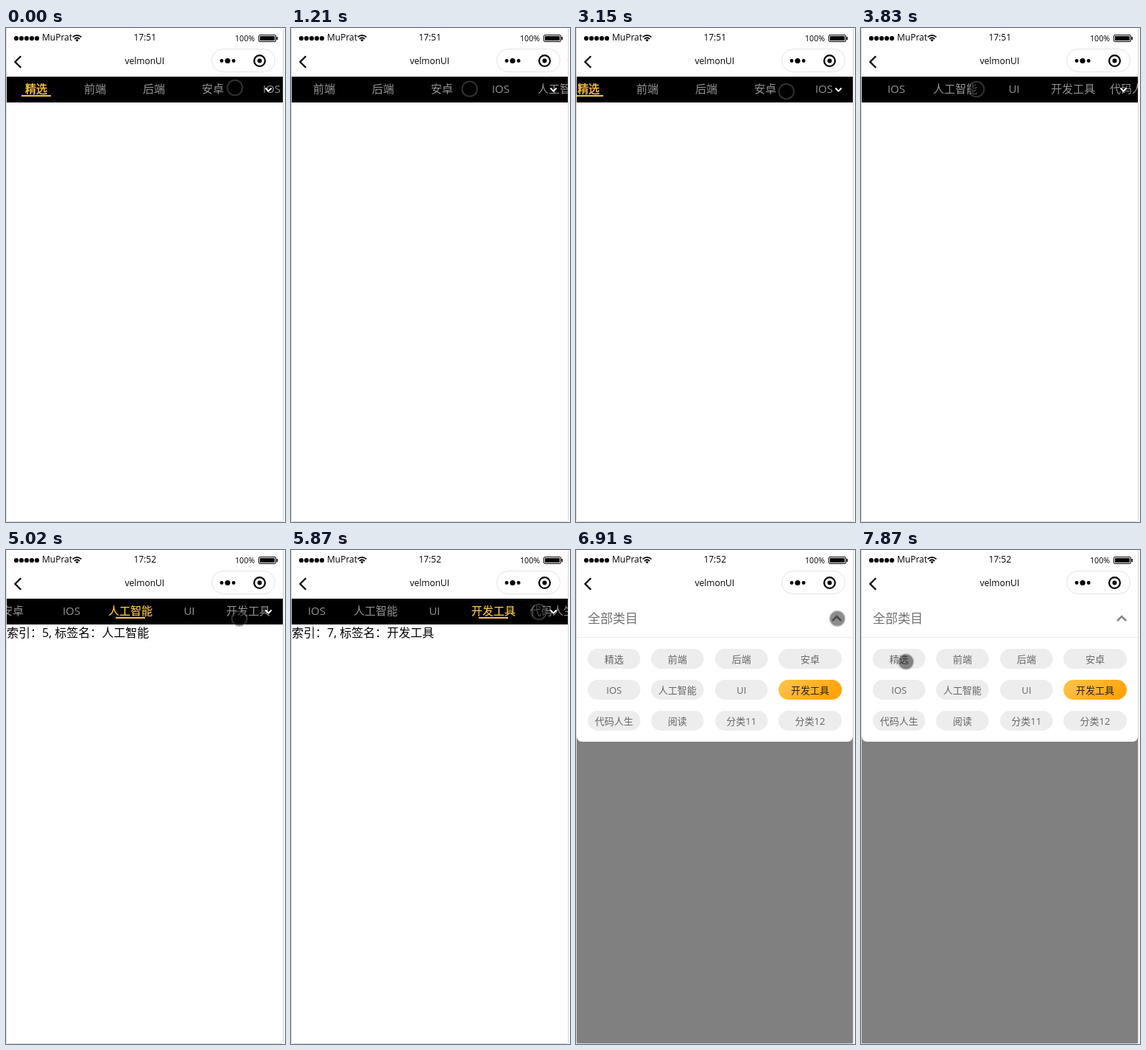
These frames come from a looping animation (379x670 px, 8000 ms). An HTML page:

```html
<!DOCTYPE html>
<html lang="zh-CN">
<head>
<meta charset="utf-8">
<title>Tabs</title>
<style>
html, body { margin: 0; width: 100%; height: 100%; overflow: hidden; background: #fff; }
svg { display: block; width: 379px; height: 670px; }
text { font-family: "Open Sans", "Noto Sans CJK SC", "Noto Sans CJK", sans-serif; white-space: pre; }
.mid { text-anchor: middle; }
.line { fill: none; stroke: #000; }
.tab { font-size: 15px; fill: #929292; }
.tab.on { fill: #f9c246; stroke: #f9c246; stroke-width: .2px; }
.pill { font-size: 13px; fill: #666; }
.pill.on { fill: #222; }
.page { filter: drop-shadow(0 0 1.5px rgba(0,0,0,.4)); }
</style>
</head>
<body>
<svg viewBox="0 0 379 670">
  <defs>
    <clipPath id="screen"><rect x="1" y="66" width="375" height="603"/></clipPath>
    <linearGradient id="gold" x1="0" y1="0" x2="1" y2="0.4">
      <stop offset="0" stop-color="#ffc64f"/><stop offset="1" stop-color="#ffa40a"/>
    </linearGradient>
  </defs>
  <rect class="page" x="1" y="0" width="375" height="669" fill="#fff"/>

  <g id="status">
    <text x="49" y="17" font-size="12">MuPrat</text>
    <g class="line" stroke-width="1.7">
      <path d="M90.6 12.4Q96.5 7.4 102.4 12.4"/>
      <path d="M92.8 14.8Q96.5 11.7 100.2 14.8"/>
    </g>
    <path d="M94.3 16Q96.5 14.4 98.7 16L96.5 18.4Z"/>
    <text id="clock" class="mid" x="188.7" y="17" font-size="12"></text>
    <text x="311" y="18" font-size="10.7">100%</text>
    <rect class="line" x="343.5" y="9.5" width="23" height="9" rx="1.5"/>
    <rect x="345" y="11" width="20" height="6"/>
    <rect x="367.5" y="12" width="1.5" height="4"/>
  </g>

  <path class="line" stroke-width="2.3" d="M20.2 38.2L12.4 46L20.2 53.8"/>
  <text class="mid" x="188.3" y="49" font-size="12">velmonUI</text>
  <rect x="279.5" y="28.5" width="86" height="31" rx="15.5" fill="#fff" stroke="#e4e4e4"/>
  <circle cx="293" cy="44.5" r="2.4"/>
  <circle cx="301" cy="44.5" r="3.6"/>
  <circle cx="309.2" cy="44.5" r="2.4"/>
  <circle class="line" cx="344.5" cy="44.5" r="7.4" stroke-width="2.2"/>
  <circle cx="344.5" cy="44.5" r="3"/>

  <g clip-path="url(#screen)">
    <rect x="1" y="66" width="375" height="35"/>
    <g id="tabs"><rect id="mark" y="91" width="40" height="2" fill="#f9c246"/></g>
    <path class="line" style="stroke:#fff" stroke-width="1.9" d="M352.4 81.5L356.5 85.6L360.6 81.5"/>
    <text id="info" x="1" y="118.3" font-size="16"></text>
    <g id="panel">
      <rect x="1" y="66" width="375" height="603" fill="#808080"/>
      <path d="M1 66H376V252Q376 260 368 260H9Q1 260 1 252Z" fill="#fff"/>
      <text x="16" y="99.3" font-size="17" fill="#707070">全部类目</text>
      <path class="line" style="stroke:#888" stroke-width="2.6" d="M348.2 96L354.2 90L360.2 96"/>
      <rect x="1" y="118" width="375" height="1" fill="#ececec"/>
    </g>
  </g>
  <g id="touch">
    <circle r="10" fill="#000" fill-opacity=".45"/>
    <circle r="10.2" fill="none" stroke="#808080" stroke-opacity=".38" stroke-width="2"/>
  </g>
</svg>
<script>
const NAMES = ["精选", "前端", "后端", "安卓", "IOS", "人工智能", "UI", "开发工具", "代码人生", "阅读", "分类11", "分类12"];
const LOOP = 8000, TAP_1 = 4320, CLOCK_AT = 5020, TAP_2 = 5720, OPEN_AT = 6910;

// bursts of screen updates: first, last, count
const BURSTS = [
  [1060, 1810, 6], [2120, 3150, 8], [3300, TAP_1, 8],
  [4440, 4590, 2], [4870, 5320, 4], [TAP_2, 6510, 7], [OPEN_AT, 7870, 8]
];

// time, scroll
const SCROLL = [
  [0, 0], [1060, 14], [1660, 262], [1810, 295], [2120, 295], [2730, 60], [3010, 10],
  [3150, 24], [3700, 313], [4200, 313], [4590, 272], [5320, 272], [TAP_2, 284], [6110, 408]
];

// time, x, y
const TOUCH = [
  [0, 311, 81], [1060, 297, 82], [1510, 134, 84], [2120, 120, 83], [2580, 284, 91],
  [3010, 308, 89], [3300, 262, 83], [3700, 157, 83], [3900, 157, 83], [TAP_1, 146, 86],
  [4590, 153, 133], [CLOCK_AT, 317, 93], [5320, 335, 84], [5980, 337, 84], [6510, 357, 81],
  [OPEN_AT, 355, 93], [7060, 353, 94], [7600, 104, 149], [7870, 61, 151.5]
];

const $ = id => document.getElementById(id);

function add(parent, tag, attrs, text = "") {
  const el = document.createElementNS("http://www.w3.org/2000/svg", tag);
  for (const key in attrs) el.setAttribute(key, attrs[key]);
  el.textContent = text;
  return parent.appendChild(el);
}

// time of the latest screen update
function lastUpdate(t) {
  const burst = BURSTS.findLast(b => b[0] <= t);
  if (!burst) return 0;
  const [first, last, count] = burst;
  const gap = (last - first) / (count - 1);
  return t >= last ? last : first + Math.floor((t - first) / gap) * gap;
}

function sample(keys, t) {
  const i = keys.findLastIndex(key => key[0] <= t);
  const a = keys[i], b = keys[i + 1] || a;
  const part = a === b ? 0 : (t - a[0]) / (b[0] - a[0]);
  return a.slice(1).map((v, k) => v + (b[k + 1] - v) * part);
}

for (let i = 0; i < 5; i++) add($("status"), "circle", { cx: 14 + i * 7, cy: 14, r: 3.1 });

const tabs = NAMES.map((name, i) => add($("tabs"), "text", { class: "tab mid", x: 41 + i * 80, y: 88 }, name));

const pills = NAMES.map((name, i) => {
  const col = i % 4, x = 16 + Math.round(col * 86.4), y = 134 + 42 * Math.floor(i / 4);
  const width = col === 3 ? 86 : 71.5;
  const box = add($("panel"), "rect", { x, y, width, height: 27, rx: 13.5 });
  const label = add($("panel"), "text", { x: x + width / 2, y: y + 18.7 }, name);
  return { box, label };
});

let selected = -1;
function select(index) {
  if (index === selected) return;
  selected = index;
  tabs.forEach((tab, i) => tab.classList.toggle("on", i === index));
  pills.forEach(({ box, label }, i) => {
    box.setAttribute("fill", i === index ? "url(#gold)" : "#ededed");
    label.setAttribute("class", i === index ? "pill mid on" : "pill mid");
  });
  // the opening tab is drawn a little heavier
  tabs[0].style.strokeWidth = index === 0 ? ".5px" : "";
  $("mark").setAttribute("x", 21 + index * 80);
  $("info").textContent = index ? `索引：${index}, 标签名：${NAMES[index]}` : "";
}

function draw(time) {
  const t = lastUpdate(time);
  const [scroll] = sample(SCROLL, t);
  const [x, y] = sample(TOUCH, t);
  select(t < TAP_1 ? 0 : t < TAP_2 ? 5 : 7);
  $("tabs").setAttribute("transform", `translate(${-Math.round(scroll)} 0)`);
  $("touch").setAttribute("transform", `translate(${x} ${y})`);
  $("clock").textContent = t < CLOCK_AT ? "17:51" : "17:52";
  $("panel").style.display = t < OPEN_AT ? "none" : "";
}

const start = performance.now();
function tick() {
  draw((performance.now() - start) % LOOP);
  requestAnimationFrame(tick);
}
tick();
</script>
</body>
</html>
```
